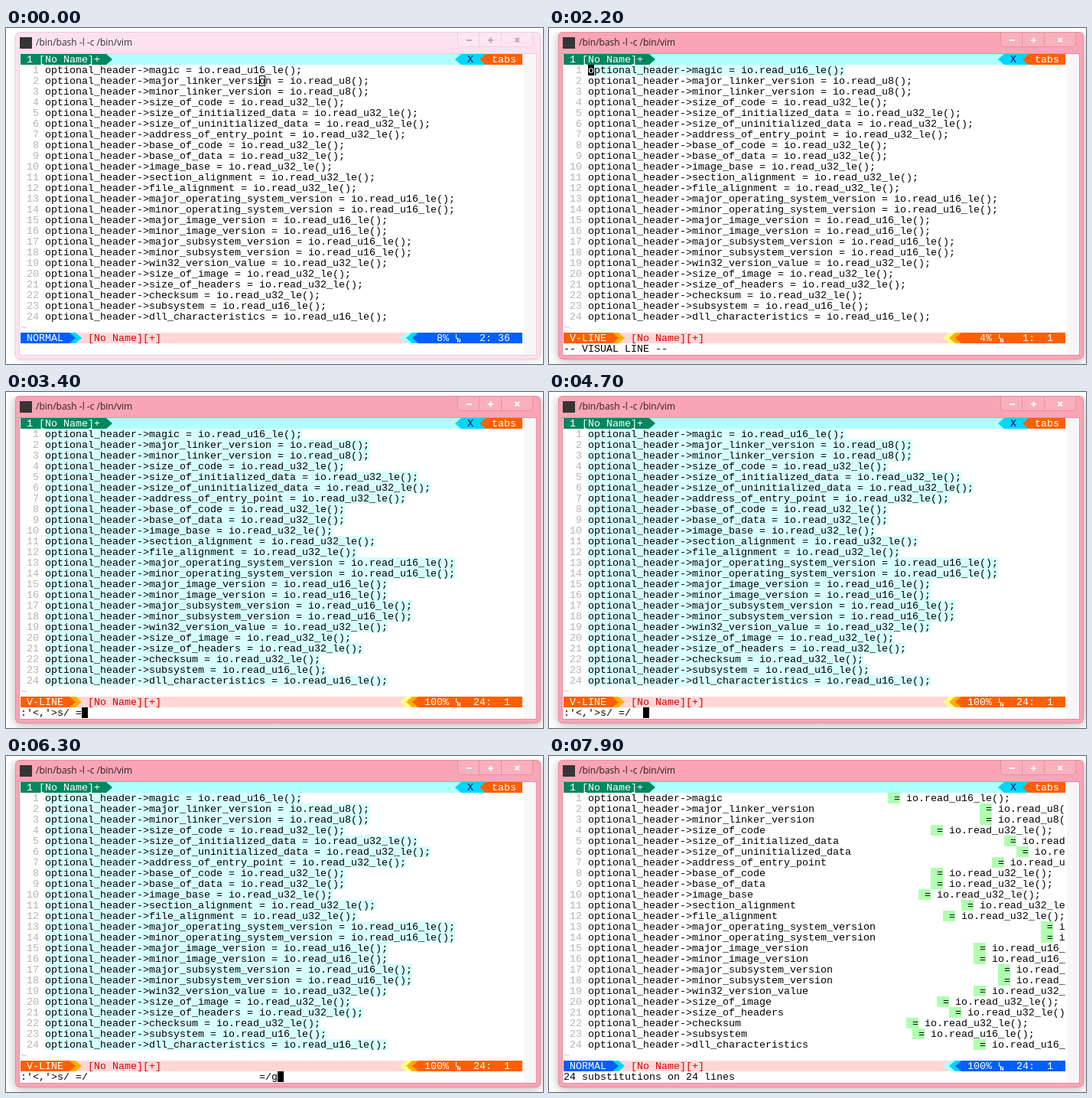
Recreate the animation shown at these times as an HTML page with a canvas. Size 702 by 439 pixels, loop 8000 ms.

```html
<!DOCTYPE html>
<html lang="en">
<head>
<meta charset="utf-8">
<title>Editor session</title>
<style>
html, body { margin: 0; width: 100%; height: 100%; overflow: hidden; background: #fff; }
canvas { display: block; }
</style>
</head>
<body>
<canvas id="stage" width="702" height="439"></canvas>
<script>
const ctx = document.getElementById("stage").getContext("2d");
const LOOP = 8000;
const CELL_W = 8, CELL_H = 14, LEFT = 19, TOP = 34, COLS = 82;
const TEXT_COL = 4, STATUS_ROW = 26, CMD_ROW = 27;
const MONO = '13.333px "Liberation Mono", monospace';

const FIELDS = `magic 16
major_linker_version 8
minor_linker_version 8
size_of_code 32
size_of_initialized_data 32
size_of_uninitialized_data 32
address_of_entry_point 32
base_of_code 32
base_of_data 32
image_base 32
section_alignment 32
file_alignment 32
major_operating_system_version 16
minor_operating_system_version 16
major_image_version 16
minor_image_version 16
major_subsystem_version 16
minor_subsystem_version 16
win32_version_value 32
size_of_image 32
size_of_headers 32
checksum 32
subsystem 16
dll_characteristics 16`.split("\n").map(line => {
  const [name, bits] = line.split(" ");
  const suffix = bits === "8" ? "" : "_le";
  return { target: "optional_header->" + name, call: ` io.read_u${bits}${suffix}();` };
});

const THEMES = {
  NORMAL: { main: "#005fff", mid: "#00d7ff", pale: "#afffff" },
  "V-LINE": { main: "#ff5f00", mid: "#ffaf00", pale: "#ffff87" }
};

const x = col => LEFT + col * CELL_W;
const y = row => TOP + row * CELL_H;

function fill(col, row, width, color) {
  ctx.fillStyle = color;
  ctx.fillRect(x(col), y(row), width * CELL_W, CELL_H);
}

function write(text, col, row, color = "#000") {
  ctx.font = MONO;
  ctx.fillStyle = color;
  ctx.fillText(text, x(col), y(row) + 11);
}

function arrow(col, row, dir, color, back) {
  fill(col, row, 1, back);
  const base = x(dir > 0 ? col : col + 1);
  ctx.fillStyle = color;
  ctx.beginPath();
  ctx.moveTo(base, y(row));
  ctx.lineTo(base + dir * CELL_W, y(row) + CELL_H / 2);
  ctx.lineTo(base, y(row) + CELL_H);
  ctx.fill();
}

function strokePath(color, ...paths) {
  ctx.strokeStyle = color;
  ctx.lineWidth = 1;
  ctx.beginPath();
  for (const path of paths) {
    path.forEach(([px, py], i) => i ? ctx.lineTo(px, py) : ctx.moveTo(px, py));
  }
  ctx.stroke();
}

// Text on the command line after the range, or null when it is closed.
function commandAt(t) {
  if (t < 2800 || t >= 6400) return null;
  const keys = [[2900, "s"], [3100, "/"], [3200, " "], [3400, "="], [3600, "/"]];
  let text = keys.filter(([at]) => t >= at).map(([, key]) => key).join("");
  let spaces = 0;
  if (t >= 4100) spaces = 1;
  if (t >= 4300 && !(t >= 4600 && t < 4700)) spaces = 2;
  if (t >= 5100) {
    const repeats = Math.floor((t - 5100) / 100) + 1;
    spaces = Math.min(28, 2 + Math.round(repeats * 3.25));
  }
  text += " ".repeat(spaces);
  if (t >= 5900) text += "=";
  if (t >= 6100) text += "/";
  if (t >= 6300) text += "g";
  return ":'<,'>" + text;
}

function stateAt(t) {
  const replaced = t >= 6400;
  const visual = t >= 2200 && !replaced;
  const line = t < 2000 ? 2 : t < 2400 ? 1 : 24;
  const command = commandAt(t);
  const blinkOff = (t >= 900 && t < 1300) || (t >= 6900 && t < 7400) || t >= 7900;
  let message = "";
  if (replaced) message = "24 substitutions on 24 lines";
  else if (command !== null) message = command;
  else if (visual) message = "-- VISUAL LINE --";
  return {
    focused: t >= 300,
    replaced, line, command, message,
    col: t < 2000 ? 36 : 1,
    mode: visual ? "V-LINE" : "NORMAL",
    selected: visual ? line : 0,
    cursorOn: command === null && !blinkOff
  };
}

function drawWindow(focused) {
  ctx.fillStyle = "#fff";
  ctx.fillRect(0, 0, 702, 439);

  ctx.save();
  ctx.beginPath();
  ctx.rect(2, 5, 700, 434);
  ctx.clip();
  ctx.shadowColor = focused ? "rgba(0,0,0,.3)" : "rgba(0,0,0,.12)";
  ctx.shadowBlur = focused ? 14 : 8;
  ctx.shadowOffsetY = 2;
  ctx.fillStyle = focused ? "#f9a5b5" : "#fce2ee";
  ctx.beginPath();
  ctx.roundRect(12, 5, 687, 428, 6);
  ctx.fill();
  ctx.restore();

  ctx.strokeStyle = focused ? "#e58d9f" : "#ecccd9";
  ctx.lineWidth = 1;
  ctx.beginPath();
  ctx.roundRect(12.5, 5.5, 686, 427, 6);
  ctx.stroke();
  ctx.strokeRect(17.5, 33.5, 676, 394);

  ctx.fillStyle = "#fff";
  ctx.fillRect(18, 34, 675, 393);
  ctx.fillStyle = "#f8f7f8";
  ctx.fillRect(677, 34, 16, 393);

  ctx.fillStyle = "#353535";
  ctx.fillRect(18, 12, 16, 15);
  ctx.font = '12px "Open Sans", sans-serif';
  ctx.fillStyle = focused ? "#2b1c20" : "#333";
  ctx.fillText("/bin/bash -l -c /bin/vim", 39, 23);

  drawButtons(focused);
}

function drawButtons(focused) {
  ctx.fillStyle = focused ? "#faafbd" : "#fce6ef";
  ctx.strokeStyle = focused ? "#e4929f" : "#ead3dd";
  ctx.beginPath();
  ctx.roundRect(590.5, 5.5, 98, 19, [0, 0, 4, 4]);
  ctx.fill();
  ctx.stroke();
  strokePath(ctx.strokeStyle, [[618.5, 6], [618.5, 24]], [[647.5, 6], [647.5, 24]]);

  const sign = focused ? "#fff" : "#b9aab1";
  ctx.fillStyle = sign;
  ctx.fillRect(602, 15, 7, 2);
  ctx.fillRect(630, 15, 7, 2);
  ctx.fillRect(632.5, 12.5, 2, 7);
  ctx.lineWidth = 2;
  ctx.beginPath();
  ctx.moveTo(665.5, 13); ctx.lineTo(671, 18.5);
  ctx.moveTo(671, 13); ctx.lineTo(665.5, 18.5);
  ctx.strokeStyle = sign;
  ctx.stroke();
}

function drawTabs() {
  fill(0, 0, COLS, "#afffff");
  fill(0, 0, 14, "#00875f");
  write("1 [No Name]+", 1, 0, "#fff");
  arrow(14, 0, 1, "#00875f", "#afffff");
  arrow(71, 0, -1, "#00d7ff", "#afffff");
  fill(72, 0, 3, "#00d7ff");
  write("X", 73, 0, "#00005f");
  arrow(75, 0, -1, "#ff5f00", "#00d7ff");
  fill(76, 0, 6, "#ff5f00");
  write("tabs", 77, 0, "#fff");
}

function drawLine(field, number, state) {
  const { target, call } = field;
  const gap = state.replaced ? " ".repeat(28) : " ";
  const text = target + gap + "=" + call;
  write(String(number).padStart(2), 1, number, "#b5b5b5");
  if (number <= state.selected) fill(TEXT_COL, number, text.length, "#d7ffff");
  if (state.replaced) fill(TEXT_COL + target.length + 27, number, 2, "#afffaf");
  write(text.slice(0, COLS - TEXT_COL), TEXT_COL, number);

  if (number === state.line && state.cursorOn) {
    const col = TEXT_COL + state.col - 1;
    if (state.focused) {
      fill(col, number, 1, "#000");
      write(text[state.col - 1], col, number, "#fff");
    } else {
      ctx.strokeStyle = "#000";
      ctx.lineWidth = 1;
      ctx.strokeRect(x(col) + .5, y(number) + .5, CELL_W - 1, CELL_H - 1);
    }
  }
}

function drawStatus({ mode, line, col }) {
  const row = STATUS_ROW, pink = "#ffd7d7";
  const { main, mid, pale } = THEMES[mode];
  fill(0, row, COLS, pink);
  fill(0, row, 8, main);
  write(mode, 1, row, "#fff");
  arrow(8, row, 1, main, mid);
  arrow(9, row, 1, mid, pink);
  write("[No Name][+]", 11, row, "#d70000");

  arrow(62, row, -1, pale, pink);
  arrow(63, row, -1, mid, pale);
  arrow(64, row, -1, main, mid);
  fill(65, row, 17, main);
  const percent = Math.floor(line * 100 / FIELDS.length) + "%";
  write(percent.padStart(4), 66, row, "#fff");
  write(String(line).padStart(2) + ":" + String(col).padStart(3), 74, row, "#fff");

  // Small "LN" sign
  const lx = x(71) + 1.5, ly = y(row) + 2;
  strokePath("#fff",
    [[lx, ly], [lx, ly + 5.5], [lx + 3, ly + 5.5]],
    [[lx + 2, ly + 11], [lx + 2, ly + 6], [lx + 5, ly + 11], [lx + 5, ly + 6]]);
}

function draw(t) {
  const state = stateAt(t);
  drawWindow(state.focused);
  drawTabs();
  FIELDS.forEach((field, i) => drawLine(field, i + 1, state));
  write("~", 0, 25, "#c4bcc0");
  drawStatus(state);
  write(state.message, 0, CMD_ROW);
  if (state.command !== null) fill(state.command.length, CMD_ROW, 1, "#000");
}

const start = performance.now();
function tick() {
  draw((performance.now() - start) % LOOP);
  requestAnimationFrame(tick);
}
tick();
</script>
</body>
</html>
```
